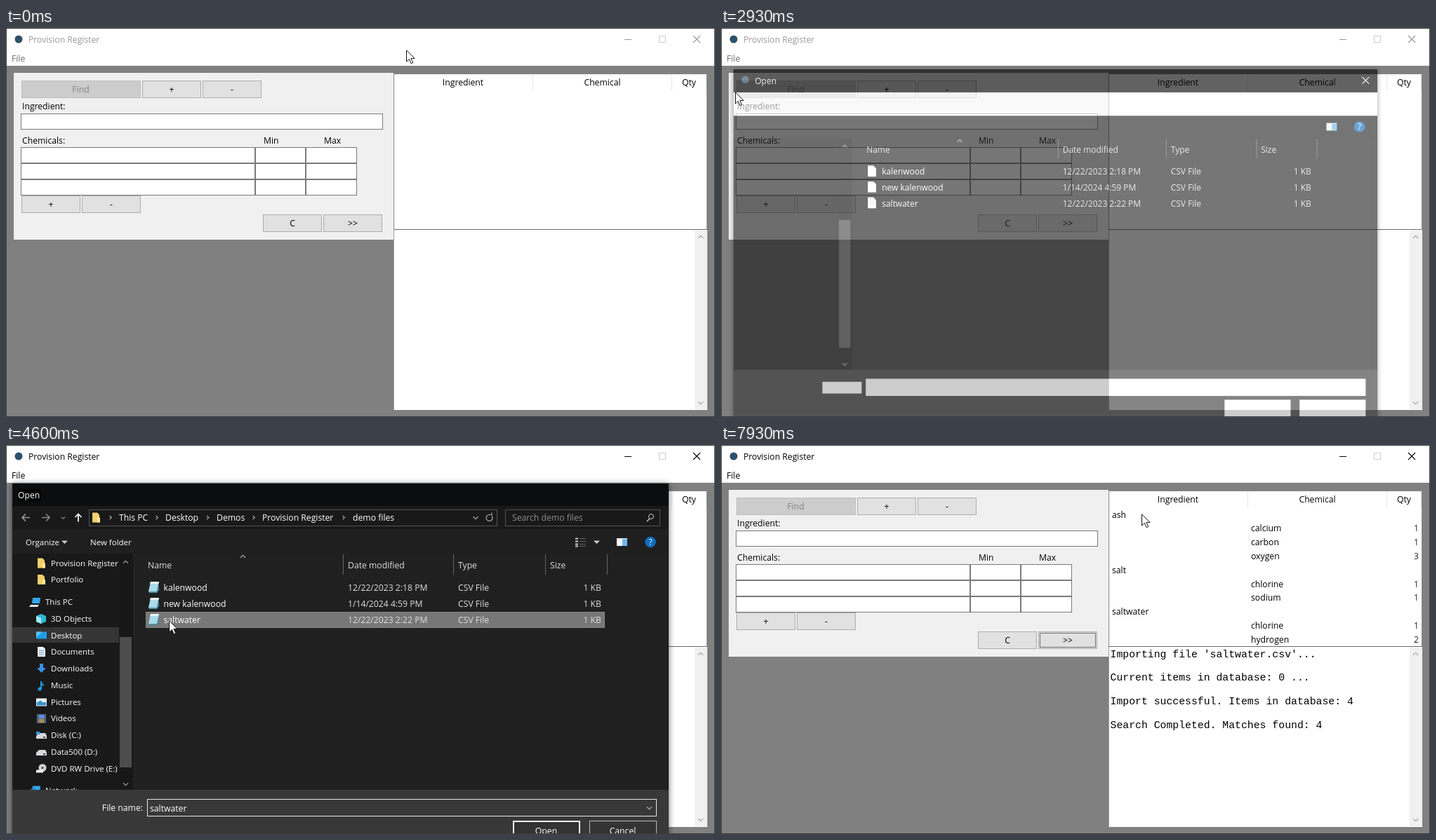
These frames come from a looping animation (1010 px wide and 555 px high, 8 s). An HTML page:

```html
<!DOCTYPE html>
<html lang="en">
<head>
<meta charset="utf-8">
<style>
  html, body { margin: 0; width: 100%; height: 100%; overflow: hidden; background: #808080; }
  svg { display: block; }
  text { font: 12.2px "Open Sans", "Noto Sans", sans-serif; white-space: pre; }
  .small { font-size: 11.5px; }
  .console { font: 14.8px "Liberation Mono", monospace; }
  .shadow { filter: drop-shadow(0 1px 4px rgba(0, 0, 0, .6)); }
</style>
</head>
<body>
<svg id="stage" width="1010" height="555" viewBox="0 0 1010 555"></svg>
<script>
const stage = document.getElementById('stage');
const LOOP = 8000, STEP = 200 / 3;
const APP = 'Provision Register';

// ---- drawing helpers (text is placed by its vertical middle) ----
const text = (x, y, s, fill = '#000', anchor = 'start', cls = '') =>
  `<text x="${x}" y="${y + 4.3}" fill="${fill}" text-anchor="${anchor}" class="${cls}">${s}</text>`;
const rect = (x, y, w, h, fill, extra = '') =>
  `<rect x="${x}" y="${y}" width="${w}" height="${h}" fill="${fill}" ${extra}/>`;
const box = (x, y, w, h, fill, stroke) =>
  rect(x + .5, y + .5, w - 1, h - 1, fill, `stroke="${stroke}"`);
const line = (d, stroke, width = 1) =>
  `<path d="${d}" fill="none" stroke="${stroke}" stroke-width="${width}"/>`;
const shape = (d, fill) => `<path d="${d}" fill="${fill}"/>`;
const dot = (x, y, r, fill) => `<circle cx="${x}" cy="${y}" r="${r}" fill="${fill}"/>`;
const chevron = (x, y, dir, color, s = 3.5) => line({
  up: `M${x - s} ${y + s / 2}l${s} ${-s} ${s} ${s}`,
  down: `M${x - s} ${y - s / 2}l${s} ${s} ${s} ${-s}`,
  right: `M${x - s / 2} ${y - s}l${s} ${s} ${-s} ${s}`
}[dir], color, 1.2);
const closeMark = (x, y, color) =>
  line(`M${x - 5} ${y - 5}l10 10m0 -10l-10 10`, color, 1.1);
const within = (p, x, y, w, h) => p.x >= x && p.x < x + w && p.y >= y && p.y < y + h;

// ---- pointer: start time, end time, control point, end point ----
const MOVES = [
  [0, 667, 200, 85, 2, 42],
  [867, 1133, 8, 42, 14, 42],
  [1533, 2133, 12, 52, 19, 61],
  [2133, 2333, 20, 70, 20, 81],
  [2600, 2933, 20, 86, 20, 91],
  [2933, 3133, 23, 94, 27, 97],
  [3267, 3733, 130, 130, 226, 180],
  [3733, 4067, 232, 215, 232, 250],
  [5067, 5800, 240, 180, 285, 133],
  [6333, 6933, 400, 190, 490, 277],
  [7267, 7933, 800, 200, 599, 98]
];

function pointerAt(t) {
  let x = 570, y = 31;
  for (const [start, end, cx, cy, ex, ey] of MOVES) {
    if (t <= start) break;
    const u = Math.min(1, (t - start) / (end - start));
    const k = u * u * (3 - 2 * u);
    const mix = (a, c, b) => (1 - k) ** 2 * a + 2 * k * (1 - k) * c + k * k * b;
    x = mix(x, cx, ex);
    y = mix(y, cy, ey);
  }
  return { x: Math.round(x), y: Math.round(y) };
}

// ---- main window ----
const ENTRIES = [[21, 122, 516, 23]];
for (const y of [170, 193, 216])
  ENTRIES.push([21, y, 334, 23], [355, y, 72, 23], [427, y, 73, 23]);

const BUTTONS = [
  [194, 75, '+'], [280, 75, '-'], [22, 239, '+'], [108, 239, '-'], [366, 266, 'C'], [452, 266, '>>']
];

const RESULTS = [
  ['ash'], ['', 'calcium', 1], ['', 'carbon', 1], ['', 'oxygen', 3],
  ['salt'], ['', 'chlorine', 1], ['', 'sodium', 1],
  ['saltwater'], ['', 'chlorine', 1], ['', 'hydrogen', 2]
];

const MESSAGES = [
  "Importing file 'saltwater.csv'...",
  'Current items in database: 0 ...',
  'Import successful. Items in database: 4',
  'Search Completed. Matches found: 4'
];

function titleBar(active, menuOpen, p) {
  const ink = active ? '#000' : '#999';
  const hot = menuOpen || within(p, 1, 33, 33, 21);
  return rect(0, 0, 1010, 54, '#fff') + rect(0, 53, 1010, 1, '#f0f0f0') +
    dot(18, 16, 5.5, '#2f5068') + text(32, 17, APP, ink) +
    line('M881 16.5h10', ink) + line('M930.5 11.5h9v9h-9z', '#ccc') + closeMark(984, 16, ink) +
    (hot ? box(1, 33, 33, 21, '#cce8ff', '#99d1ff') : '') +
    text(8, 44, 'File', active ? '#000' : '#6d6d6d');
}

function button([x, y, label], p, t) {
  const hover = within(p, x, y, 84, 25);
  const pressed = hover && t > 6990 && t < 7120;
  const fill = pressed ? '#cce4f7' : hover ? '#e5f1fb' : '#e1e1e1';
  const stroke = pressed ? '#005499' : hover ? '#0078d7' : '#adadad';
  const focused = label === '>>' && t > 6990;
  return box(x, y, 84, 25, fill, stroke) +
    (focused ? rect(x + 2.5, y + 2.5, 79, 20, 'none', 'stroke="#000" stroke-dasharray="1 1"') : '') +
    text(x + 42, y + 13, label, '#000', 'middle');
}

function form(p, t) {
  return rect(11, 64, 541, 238, '#f0f0f0') +
    box(22, 75, 170, 25, '#ccc', '#bfbfbf') + text(106.5, 88, 'Find', '#838383', 'middle') +
    text(23, 112, 'Ingredient:') + text(23, 160.5, 'Chemicals:') +
    text(367, 160.5, 'Min') + text(453, 160.5, 'Max') +
    ENTRIES.map(e => box(...e, '#fff', !dialogOpacity(t) && within(p, ...e) ? '#171717' : '#7a7a7a')).join('') +
    BUTTONS.map(b => button(b, p, t)).join('');
}

function results(t) {
  const rows = t < 7060 ? '' : RESULTS.map(([name, chemical = '', qty = ''], i) => {
    const y = 99.3 + 19.8 * i;
    return text(557, y, name) + text(755, y, chemical) + text(994, y, qty, '#222', 'end');
  }).join('');
  return box(552, 65, 447, 223, '#fff', '#828790') +
    text(651, 77.5, 'Ingredient', '#000', 'middle') +
    text(849.5, 77.5, 'Chemical', '#000', 'middle') + text(973, 77.5, 'Qty', '#000', 'middle') +
    line('M750.5 66v23M948.5 66v23M997.5 66v23', '#e5e5e5') + rows;
}

function consolePane(t) {
  const count = t > 7060 ? 4 : t > 4860 ? 3 : 0;
  return rect(552, 288, 447, 257, '#fff') + rect(552, 287, 447, 1, '#646870') +
    line('M552.5 288v257', '#a0a0a0') + rect(981, 289, 18, 255, '#f0f0f0') +
    chevron(989.5, 298, 'up', '#a6a6a6') + chevron(989.5, 535, 'down', '#a6a6a6') +
    MESSAGES.slice(0, count).map((m, i) => text(554.5, 298.5 + 33.6 * i, m, '#000', 'start', 'console')).join('');
}

function menu(p) {
  return `<g class="shadow">${box(1, 54, 109, 68, '#f2f2f2', '#a0a0a0')}</g>` +
    ['New', 'Import CSV', 'Export CSV'].map((label, i) => {
      const y = 57.5 + 20.8 * i;
      const hover = within(p, 3, y, 105, 20.8);
      return (hover ? rect(4, y, 103, 20.8, '#91c9f7') : '') + text(25, y + 10.4, label);
    }).join('');
}

// ---- file dialog ----
const FILES = [
  ['kalenwood', '12/22/2023 2:18 PM'],
  ['new kalenwood', '1/14/2024 4:59 PM'],
  ['saltwater', '12/22/2023 2:22 PM']
];

const folder = shape('M-5 -7h7l3 3v11h-10z', '#f6cf6b') + shape('M2 0h4v7h-4z', '#fbe6a6');
const screen = shape('M-7 -5h15v10h-15z', '#1e9be9') + shape('M-7 -5h9l-9 8z', '#5cc0f5');
const computer = shape('M-4 -6h11l-1 8h-11z', '#35a7ea') + shape('M-7 4h12l-2 3h-12z', '#dce6ec');
const drive = shape('M-7 1l4 -4h9l2 4v4h-15z', '#d5d9dc') + shape('M3 2h3v2h-3z', '#4a4a4a');
const page = shape('M-5 -7h8l3 3v11h-11z', '#f1f4f6') + line('M-3 -2h7M-3 1h7M-3 4h7', '#4a90c8');
const PLACES = [
  [168.5, APP, folder], [192, 'Portfolio', folder],
  [224, 'This PC', computer, -8],
  [248, '3D Objects', shape('M-7 -4l7 -3 7 3v8l-7 3 -7 -3z', '#30b7d8') + shape('M-7 -4l7 3v8l-7 -3z', '#a7e9f5')],
  [271.5, 'Desktop', screen], [295, 'Documents', page],
  [319, 'Downloads', shape('M-2 -7h5v6h4l-6.5 7 -6.5 -7h4z', '#3a8ee6')],
  [343, 'Music', line('M0 5v-11q0 4 4 6', '#1e9be9', 2) + dot(-2, 5, 2.6, '#1e9be9')],
  [366.5, 'Pictures', shape('M-7 -5h15v11h-15z', '#e8f2f8') + shape('M-6 5v-4l5 -3 4 3 4 -1v5z', '#3c91c9')],
  [390, 'Videos', shape('M-6 -6h13v13h-13z', '#53677e') + shape('M-3 -5h7v5h-7z', '#5b8ee0') + shape('M-3 1h7v5h-7z', '#b08a4e')],
  [414, 'Disk (C:)', drive + shape('M-7 -5h5v4h-5z', '#27a3e8')],
  [438, 'Data500 (D:)', drive],
  [461.5, 'DVD RW Drive (E:)', dot(2, -1, 5.5, '#cfd4d8') + dot(2, -1, 1.5, '#444') + shape('M-7 2h10v4h-10z', '#eee')],
  [492.5, 'Network', computer + dot(-3, 1, 4, '#2c83c8'), -8]
];

function dialogOpacity(t) {
  if (t < 2860 || t > 4790) return 0;
  if (t < 2930) return .3;
  if (t < 2990) return .61;
  if (t < 3060) return .86;
  return t < 4660 ? 1 : t < 4730 ? .6 : .22;
}

function addressRow() {
  const crumbs = [[161, 'This PC'], [227, 'Desktop'], [300, 'Demos'], [365, APP], [494, 'demo files']];
  const arrow = (d, color) => line(d, color, 1.7);
  return arrow('M34 103.5h-11m5 -5l-5 5 5 5', '#999') + arrow('M51 103.5h11m-5 -5l5 5 -5 5', '#888') +
    chevron(81.5, 104, 'down', '#888', 2.5) + arrow('M103 109.5v-11m-4.5 4.5l4.5 -4.5 4.5 4.5', '#fff') +
    box(118, 92, 582, 24, '#191919', '#535353') + `<g transform="translate(128 103.5)">${folder}</g>` +
    crumbs.map(([x, s]) => text(x, 103.5, s, '#fff')).join('') +
    [149, 215, 287.5, 353, 481].map(x => chevron(x, 103.5, 'right', '#aaa', 2.5)).join('') +
    chevron(669, 104, 'down', '#aaa') + line('M692 101a4.5 4.5 0 1 1 -4 -1.5h4v-3', '#aaa', 1.2) +
    box(711, 92, 221, 24, '#191919', '#535353') + text(721, 104, 'Search demo files', '#8d8d8d') +
    line('M913 109l4 -4', '#ccc', 1.5) + `<circle cx="919" cy="102" r="3.5" fill="none" stroke="#ccc"/>`;
}

function toolbar(loading) {
  return (loading ? '' :
    text(28, 138.5, 'Organize', '#fff', 'start', 'small') + shape('M79 136.5h9l-4.5 4.5z', '#ccc') +
    text(120, 138.5, 'New folder', '#fff', 'start', 'small') +
    line('M811 133.5h4m-4 4h4m-4 4h4m-4 3h4', '#ccc', 2) + line('M817 133.5h9m-9 4h9m-9 4h9m-9 3h9', '#666') +
    shape('M837 136.5h9l-4.5 4.5z', '#ccc')) +
    rect(870, 133, 15, 11, '#f4f4f4') + rect(878, 134, 7, 10, '#6cb7ee') +
    dot(918, 138.5, 7.8, '#0f6cbd') + text(918, 138.5, '?', '#fff', 'middle');
}

function sidebar(loading) {
  const places = PLACES.map(([y, label, icon, shift = 0]) =>
    `<g transform="translate(${50 + shift} ${y})">${icon}</g>` +
    text(64 + shift, y, label, '#fff', 'start', 'small')).join('');
  return rect(9, 155, 174, 337, '#191919') +
    (loading ? '' : rect(9, 260, 152, 22, '#353535') +
      `<svg x="9" y="155" width="152" height="337" viewBox="9 155 152 337">${places}</svg>`) +
    rect(162, 156, 17, 336, '#171717') + rect(162, 274, 17, 186, '#4d4d4d') +
    chevron(170.5, 167, 'up', '#999') + chevron(170.5, 484, 'down', '#999') +
    line('M182.5 155v337', '#2b2b2b');
}

function fileRow([name, date], i, p, t, loading) {
  const y = 204 + 23 * i;
  const selected = i === 2 && t > 4120;
  const hover = !loading && within(p, 199, y - 11, 654, 23);
  const icon = loading ? shape('M-6 -8h8l4 4v12h-12z', '#fff')
    : shape('M-4 -8h12l-3 14h-12z', '#a8dceb') + shape('M-4 -8h12l-1 3h-12z', '#e8f4f7') +
      shape('M-7 6h12l3 -10v8l-3 4h-11z', '#4b8ba0');
  return (selected ? box(199, y - 12, 654, 23, '#777', '#858585') : hover ? rect(199, y - 12, 654, 23, '#4d4d4d') : '') +
    `<g transform="translate(210 ${y - 1})">${icon}</g>` + text(224.5, y, name, '#fff') +
    text(487, y, date, '#dedede') + text(644, y, 'CSV File', '#dedede') + text(848, y, '1 KB', '#dedede', 'end');
}

function fileList(p, t, loading) {
  const headerHover = !loading && within(p, 184, 156, 296, 30);
  return rect(183, 155, 761, 337, '#202020') +
    (headerHover ? rect(184, 156, 296, 29, '#434343') + line('M463.5 156v29', '#606060') + chevron(471.5, 171, 'down', '#aaa', 3) : '') +
    line('M480.5 156v29M637.5 156v29M768.5 156v29M856.5 156v29', '#636363') +
    chevron(337.5, 159, 'up', '#aaa') +
    [[202, 'Name'], [487, 'Date modified'], [644, 'Type'], [775, 'Size']]
      .map(([x, s]) => text(x, 171.5, s, '#dedede')).join('') +
    FILES.map((f, i) => fileRow(f, i, p, t, loading)).join('');
}

function footer(t, loading) {
  if (loading) return rect(138, 509.5, 57, 17, '#fff') + rect(201, 505, 726, 25, '#fff') +
    rect(722, 535.5, 96, 40, '#fff') + rect(831, 535.5, 96, 40, '#fff');
  return text(195, 518, 'File name:', '#fff', 'end') + box(201, 505, 726, 25, '#383838', '#e8e8e8') +
    (t > 4120 ? text(205, 518.5, 'saltwater', '#fff') : '') + chevron(916.5, 518, 'down', '#aaa') +
    rect(723, 537, 94, 30, '#333', 'stroke="#fff" stroke-width="2"') + text(769.5, 550.5, 'Open', '#fff', 'middle') +
    box(831, 536, 96, 30, '#333', '#bbb') + text(878.5, 550.5, 'Cancel', '#fff', 'middle');
}

function dialog(p, t) {
  const opacity = dialogOpacity(t);
  if (!opacity) return '';
  const loading = t < 3100, closing = t > 4530;
  const scale = .951 + .049 * opacity;
  const title = closing
    ? rect(9, 55, 935, 34, '#0b0d0e') + rect(16, 63, 33, 17, '#000') + text(17, 72, 'Open', '#fff')
    : rect(9, 55, 935, 34, '#000') + dot(26, 70, 5.5, '#2f5068') + text(40, 72, 'Open', '#fff') + closeMark(927, 71, '#fff');
  return `<g opacity="${opacity}" transform="translate(474.5 265) scale(${scale}) translate(-474.5 -265)">` +
    `<g class="shadow">${rect(9, 55, 935, 540, '#1f1f1f')}</g>` + title +
    (loading ? rect(9, 88.5, 935, 34, '#fff') : rect(9, 87, 935, 33, '#191919') + addressRow()) +
    toolbar(loading) + sidebar(loading) + fileList(p, t, loading) +
    rect(9, 492, 935, 110, '#383838') + footer(t, loading) + '</g>';
}

function pointer(p, t) {
  const overEntry = !dialogOpacity(t) && ENTRIES.some(e => within(p, ...e));
  const art = overEntry
    ? line('M-3 -7.5h2.5l1 1 1 -1h2.5M.5 -7v14M-3 7.5h2.5l1 -1 1 1h2.5', '#000')
    : '<path d="M.5 .8v16.2l3.8 -3.6 2.9 6.3 2.6 -1.2 -2.9 -6.1h5.2z" fill="#fff" stroke="#111"/>';
  return `<g transform="translate(${p.x} ${p.y})">${art}</g>`;
}

function scene(t) {
  const p = pointerAt(t);
  const menuOpen = t > 1330 && t < 2530;
  const active = (t > 1330 && t < 2860) || t > 4530;
  return rect(0, 0, 1010, 555, '#808080') + titleBar(active, menuOpen, p) +
    form(p, t) + results(t) + consolePane(t) + (menuOpen ? menu(p) : '') +
    dialog(p, t) + rect(.5, .5, 1009, 554, 'none', 'stroke="#3c3c3c"') + pointer(p, t);
}

// The screen is refreshed at a fixed 15 steps per second.
const begin = performance.now();
let shown = -1;
function tick() {
  const step = Math.floor(((performance.now() - begin) % LOOP + 4) / STEP) % 120;
  if (step !== shown) {
    shown = step;
    stage.innerHTML = scene(step * STEP);
  }
  requestAnimationFrame(tick);
}
tick();
</script>
</body>
</html>
```
